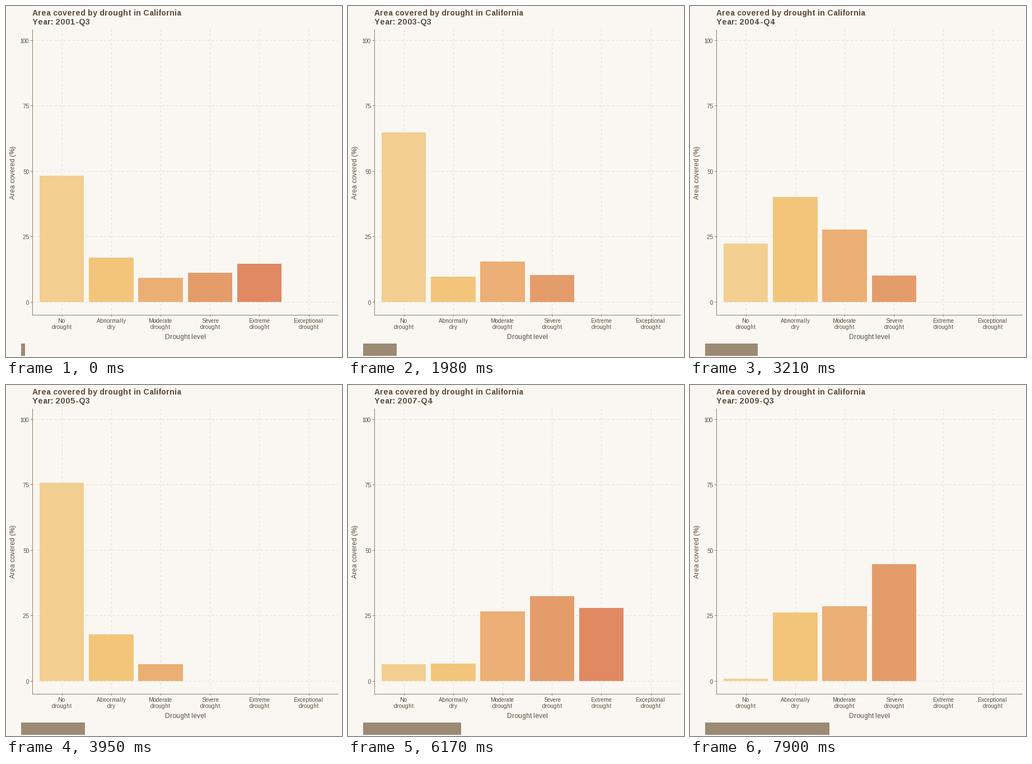
Animation, 600 px wide and 625 px high, one loop 8000 ms. Source, as a matplotlib script:

```python
import numpy as np
import matplotlib.pyplot as plt
from matplotlib.animation import FuncAnimation
from matplotlib.collections import LineCollection
from matplotlib.patches import Rectangle

W, H, DPI = 600, 625, 100
PX = 72 / DPI                       # one pixel in points
LOOP, STEP = 8000, 20               # ms
QUARTERS = 33
QUARTER_MS = 7900 / (QUARTERS - 1)

BG, GRID, AXIS, TEXT = "#faf7f2", "#e3ddd2", "#8f7c62", "#5b4a3c"
LEFT, RIGHT, TOP, BOTTOM = 47, 594, 42, 550
COLORS = ["#f3ce91", "#f3c57b", "#ebaf75", "#e59c6b", "#e08963"]
LEVELS = ["No\ndrought", "Abnormally\ndry", "Moderate\ndrought",
          "Severe\ndrought", "Extreme\ndrought", "Exceptional\ndrought"]

# Turning points: quarters since 2001-Q3, then percent per drought level.
# The drought-free share is whatever the levels leave over.
KEYS = {
    0: (17.0, 9.3, 11.2, 14.6),
    3: (21.3, 13.6, 23.4, 2.8),
    8: (9.7, 15.5, 10.4, 0),
    13: (40.2, 27.7, 10.1, 0),
    15: (20, 8, 0, 0),
    20: (9.5, 0.7, 0, 0),
    25: (6.7, 26.7, 32.5, 28.0),
    32: (26.2, 28.6, 44.7, 0),
}
TRACKS = list(zip(*KEYS.values()))


def area(q):
    dry = [np.interp(q, list(KEYS), track) for track in TRACKS]
    return [100.4 - sum(dry), *dry]


def col_x(i):
    return 99.65 + 88.2 * i


def val_y(v):
    return 527.1 - 4.655 * v


plt.rcParams.update({"font.family": "Liberation Sans",
                     "text.hinting_factor": 1})
fig = plt.figure(figsize=(W / DPI, H / DPI), dpi=DPI, facecolor=BG)
ax = fig.add_axes([0, 0, 1, 1])
ax.set_xlim(0, W)
ax.set_ylim(H, 0)
ax.axis("off")


def label(x, y, s, size, ha="center", **kw):
    return ax.text(x, y, s, size=size * PX, ha=ha, va="baseline",
                   color=TEXT, **kw)


def lines(segments, color, z, style="solid"):
    ax.add_collection(LineCollection(segments, colors=color, linewidths=PX,
                                     linestyles=style, zorder=z, snap=False))


def box(x, y, w, h, color):
    return ax.add_patch(Rectangle((x, y), w, h, fc=color, lw=0, zorder=2))


ticks = range(0, 101, 25)
cols = [round(col_x(i)) + 0.5 for i in range(len(LEVELS))]
rows = [int(val_y(v)) + 0.5 for v in ticks]

lines([[(LEFT, y), (RIGHT, y)] for y in rows]
      + [[(x, BOTTOM), (x, TOP)] for x in cols], GRID, 1, (0, (4, 4)))
lines([[(LEFT + 0.5, TOP), (LEFT + 0.5, BOTTOM + 1)],
       [(LEFT, BOTTOM + 0.5), (RIGHT, BOTTOM + 0.5)]]
      + [[(LEFT - 3, y), (LEFT, y)] for y in rows]
      + [[(x, BOTTOM), (x, BOTTOM + 3)] for x in cols], AXIS, 3)

for v, y in zip(ticks, rows):
    label(41, y + 4.5, str(v), 10, "right")
for i, name in enumerate(LEVELS):
    for k, word in enumerate(name.split("\n")):
        label(col_x(i) + 0.3, 564 + 11 * k, word, 10)

label(320, 593, "Drought level", 12)
label(16, 296.5, "Area covered (%)", 12, rotation=90, rotation_mode="anchor")
label(47, 17, "Area covered by drought in California", 14, "left",
      weight="bold")
year = label(47, 33, "", 14, "left", weight="bold")

bars = [box(col_x(i) - 39.7, val_y(0), 79.4, 0, c)
        for i, c in enumerate(COLORS)]
progress = box(27, 601, 0, 22, "#9c8a74")


def draw(n):
    t = n * STEP + STEP / 2
    q = min(QUARTERS - 1, int((t + 5) / QUARTER_MS))
    y, k = divmod(q + 2, 4)
    year.set_text(f"Year: {2001 + y}-Q{k + 1}")
    for bar, v in zip(bars, area(q)):
        bar.set_height(val_y(v) - val_y(0))
    progress.set_width(6.72 * (q + 1))
    return [*bars, progress, year]


anim = FuncAnimation(fig, draw, frames=LOOP // STEP, interval=STEP,
                     repeat=True, repeat_delay=0, blit=False)
plt.show()
```
